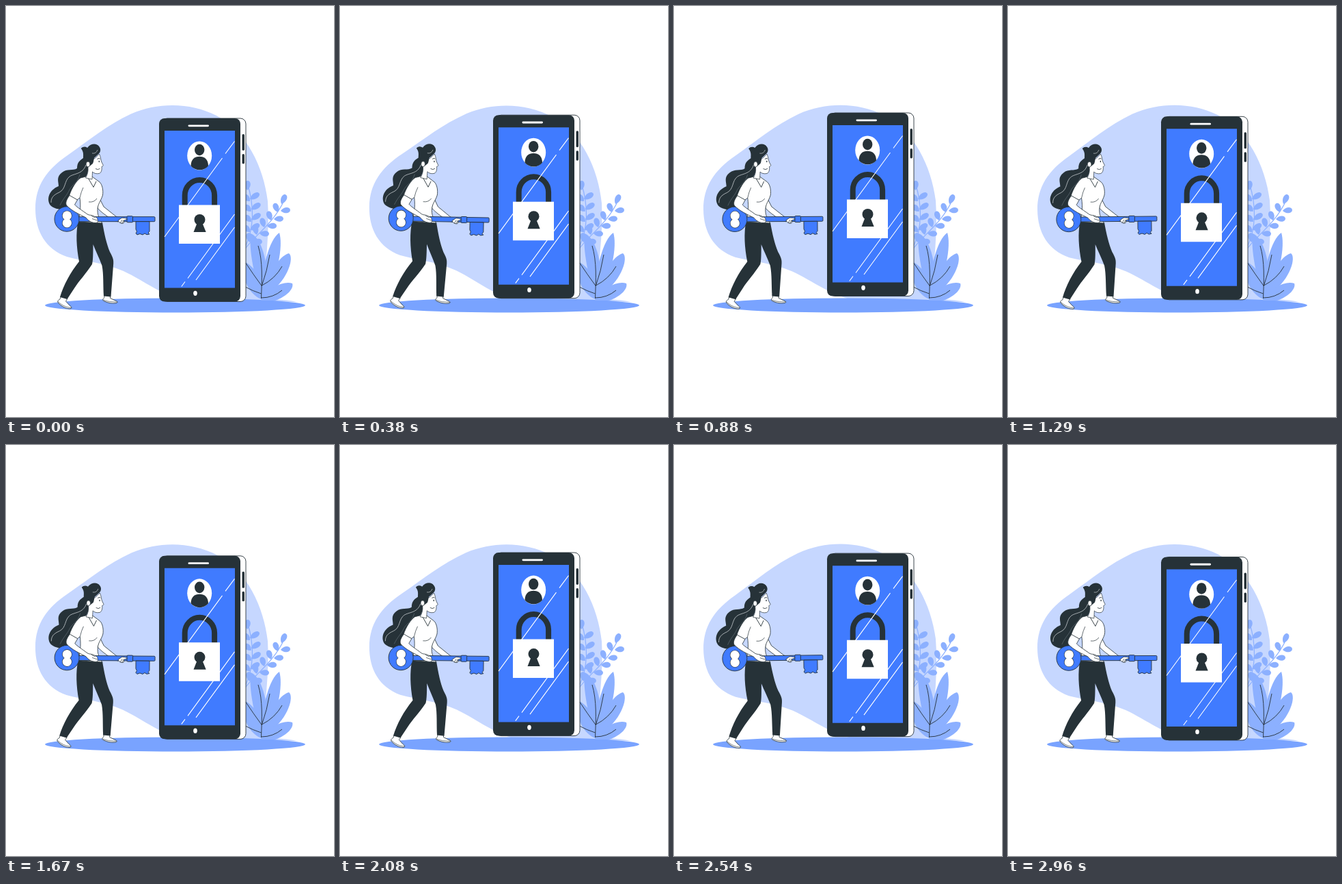
Recreate the animation shown at these times as an HTML page with a canvas. Size 480 by 600 pixels, loop 3 s.

```html
<!DOCTYPE html>
<html lang="en">
<head>
<meta charset="utf-8">
<title>Unlock</title>
<style>
html, body { margin: 0; width: 100%; height: 100%; overflow: hidden; background: #fff; }
canvas { display: block; width: 480px; height: 600px; }
</style>
</head>
<body>
<canvas id="stage"></canvas>
<script>
const canvas = document.getElementById('stage');
const ctx = canvas.getContext('2d');
const ratio = window.devicePixelRatio || 1;
canvas.width = 480 * ratio;
canvas.height = 600 * ratio;

const DARK = '#263238', BLUE = '#407bff', PALE = '#c6d7ff';
const LEAF = '#8cb0ff', FLOOR = '#79a3ff', WHITE = '#fff';
const CYCLE = 1500, LOOP = 3000, FPS = 24;
const TAU = Math.PI * 2;

function paint(path, fill, stroke, width = 0.9) {
  if (fill) { ctx.fillStyle = fill; ctx.fill(path); }
  if (stroke) { ctx.strokeStyle = stroke; ctx.lineWidth = width; ctx.stroke(path); }
}
const shape = (d, fill, stroke, width) => paint(new Path2D(d), fill, stroke, width);
const line = (d, color = DARK, width = 0.9) => shape(d, null, color, width);

function oval(x, y, rx, ry, fill, stroke, width) {
  const p = new Path2D();
  p.ellipse(x, y, rx, ry, 0, 0, TAU);
  paint(p, fill, stroke, width);
}
function box(x, y, w, h, r, fill, stroke) {
  const p = new Path2D();
  p.roundRect(x, y, w, h, r);
  paint(p, fill, stroke);
}
function turned(deg, x, y, draw) {
  ctx.save();
  ctx.translate(x, y);
  ctx.rotate(deg * Math.PI / 180);
  ctx.translate(-x, -y);
  draw();
  ctx.restore();
}
// small leaf growing from (x, y), heading in degrees clockwise from up
function leaf(x, y, heading, len = 13, w = 4.6) {
  turned(heading, x, y, () => shape(
    `M${x} ${y}C${x - w * 1.4} ${y - len * .4} ${x - w} ${y - len} ${x} ${y - len}` +
    `C${x + w} ${y - len} ${x + w * 1.4} ${y - len * .4} ${x} ${y}Z`, LEAF));
}

function blob() {
  shape('M43 296C43 263 59 239 90 218C124 194 148 174 183 157.500C224 140 270 141 308 160' +
    'C352 183 377 235 383 285C386 330 380 380 374 428C350 434 300 436 268 431' +
    'C228 423 204 402 172 387C142 374 115 373 89 366C58 355 43 329 43 296Z', PALE);
}

function plants() {
  line('M350 352C364 322 363 290 353 258', LEAF, 1.2);
  leaf(353, 269, 4, 14);
  for (let i = 0; i < 4; i++) {
    const x = 357 + Math.sin(i) * 2, y = 282 + i * 15;
    leaf(x, y, 58, 16);
    leaf(x, y + 3, -45, 13);
  }
  line('M349 356C362 336 390 320 407 284', LEAF, 1.2);
  leaf(403, 289, 25, 15);
  const twigs = [[400, 299], [390, 311], [380, 321], [369, 332], [359, 343]];
  twigs.forEach(([x, y], i) => {
    leaf(x + 2, y, 84 + i * 3, 14);
    leaf(x - 2, y + 2, -22 + i * 3, 14);
  });

  shape('M374 428C356 422 345 398 344 370C362 379 376 397 380 414Z', LEAF);
  shape('M373 424C364 396 355 357 358 332C371 337 382 362 383 408Z', LEAF);
  shape('M373 420C374 384 385 341 400 331C405 347 400 384 385 412Z', LEAF);
  shape('M374 427C380 395 399 365 414 361C422 367 413 398 387 418Z', LEAF);
  shape('M373 428C385 411 406 401 419 405C422 413 409 425 394 430L373 430Z', LEAF);
  line('M373.500 427C374.500 400 376 373 369 350');
  line('M374.500 408Q382 387 386 363');
  line('M374.500 408Q394 398 404 380');
  line('M374.500 409Q362 392 350 374');
  line('M373.500 426Q391 426 404 415');
  line('M373.500 420Q361 416 350 410');
}

function phone() {
  box(228, 164, 123, 267.500, 8, WHITE, DARK);
  box(224, 164, 119, 267.500, 8, DARK);
  box(345.500, 187, 3.500, 24, 1.700, DARK);
  box(345.500, 216, 3.500, 14.500, 1.700, DARK);
  box(232, 182, 103, 229.500, 0, BLUE);
  box(266.500, 173.400, 30.500, 2.800, 1.400, WHITE);
  oval(277, 419.300, 2.800, 3.600, WHITE);

  oval(283.200, 218.500, 18, 21, WHITE);
  oval(283.200, 210, 7.200, 8.300, DARK);
  shape('M270.500 233.500C270.500 224 276 219.800 283.200 219.800S296 224 296 233.500' +
    'C290 241.200 277 241.200 270.500 233.500Z', DARK);

  line('M261.700 292V276.500A21.700 22.500 0 0 1 305.100 276.500V292', DARK, 8);
  box(253, 290.500, 60, 56.500, 0, WHITE);
  oval(283.500, 312, 8, 8, DARK);
  shape('M280 316L274.500 330H292.700L287 316Z', DARK);

  line('M334.500 197.500L321 215.500M316.500 222L232 337', WHITE, 1.1);
  line('M334.500 304L266 397.500M262 402.500L256.800 409.500M334.500 323L278 400', WHITE, 1.1);
}

function hair() {
  shape('M110 208C113 205 116 205 119 207C124 200 133 200 136 205C140 209 138 215 134 217' +
    'C131 221 126 223 123 226C120 236 122 246 113 253C105 260 103 267 97 273' +
    'C90 282 92 291 88 297C80 298 70 296 65 291C59 283 62 269 77 263' +
    'C77 256 73 250 82 243C89 237 98 241 104 237C104 229 107 226 113 222C113 217 114 214 110 208Z', DARK);
  line('M117 232C112 246 100 244 93 249C85 255 88 267 78 272C69 276 66 280 66 287', '#dfe3e5', 0.7);
  line('M108 246C105 258 97 261 93 268C89 277 84 280 79 291', '#77838a', 0.5);
}

function head() {
  shape('M122 226C128 225 133 220 136.500 216C139 221 138.500 225 140 228L142.300 232.500' +
    'C142 234 140.800 234 140 234.500C140.500 238 140 243 136.500 244.500' +
    'C132 245.500 128 244 126.500 242L126 253L116.500 251C119.500 246 120.500 241 120 236Z',
    WHITE, DARK, 0.7);
  shape('M110 208C113 205 117 206 120 208C125 201 133 201 136 205C139 210 137 216 131 219' +
    'C128 221 129 226 127 230L121 235C116 229 114 221 116 215Z', DARK);
  oval(120, 231, 2.800, 3.800, WHITE, DARK, 0.6);
  oval(136.300, 227, 0.7, 1.2, DARK);
  line('M133.500 223.500Q135.500 221.800 137.500 223', DARK, 0.9);
  line('M131 237.500Q134.500 240 137.500 237.300', DARK, 0.8);
  line('M126 215Q132 216 134 210', '#dfe3e5', 0.6);
}

function legs() {
  shape('M143.500 421L144 425.500C141 428 141 430 144 431C150 434 157 434.500 162 433.500' +
    'C164 432.500 163 431 160 430L152.500 426.500V421Z', WHITE, DARK, 0.8);
  line('M142.500 429C148 431.500 154 432 163 432', DARK, 0.6);
  shape('M80.500 423L79 428C75 430 75 432 77 434C82 439 88 442 94 442' +
    'C97 441 96 439 93 437L87.500 431L90 427Z', WHITE, DARK, 0.8);
  line('M76 431.500C82 437 88 440 95.500 440.500', DARK, 0.6);
  shape('M105.500 314L141 316C144 333 147 347 152 359C157 368 157.500 371 157.200 376' +
    'L153.500 424.500L143 423.500C142 408 143 392 140.500 379C136 367 131 357 127.500 348' +
    'C127.500 360 127.500 371 126 377C117 391 107 401 100 412L89.500 428L79 425' +
    'C84 408 94 389 107 373C103 352 102 332 105.500 314Z', DARK);
}

function torso() {
  shape('M136 279L143 293L160 306.500L167 311L164 315L155 312C147 306 139 301 134 295Z', WHITE, DARK, 0.8);
  shape('M117 249L126 249L137 257C141 261 142.500 269 141.500 276C139 285 133.500 289 134 299' +
    'C134 307 138 312 140.500 317L105.500 315C108 305 110 294 108 280L104 283L92.500 277' +
    'C96 266 103 255 109 251Z', WHITE, DARK, 0.8);
  line('M119.500 250L128 264.500L132 256');
  line('M108 280Q110 271 113 265M121 286Q129 287 133 281', DARK, 0.7);
}

function keyShape() {
  box(104, 307.700, 114, 7, 1.2, BLUE, DARK);
  oval(89, 311, 18, 18.200, BLUE, DARK);
  for (const pass of [[DARK, 7.3], [WHITE, 6.7]])
    for (const y of [306, 316.800]) oval(89.300, y, pass[1], pass[1], pass[0]);
  shape('M190 314.700H210V329L208 331L210 333L206 333.800L203 332L200 334L196 332.500L192 334' +
    'L190 332L191.500 329L190 326Z', BLUE, DARK);
  box(177, 306.800, 8.500, 9, 1, BLUE, DARK);
}

function arms() {
  shape('M93 276.500C89 282 86.500 287 88.500 291C96 299 107 304 117 309' +
    'C120 313 124 316 130 316.500C134 317 135 314.500 134 312C134.500 309.500 132 308.500 129 307' +
    'C125 304.500 122 306 119 304C111 298 104 294 100.500 290L104.500 283Z', WHITE, DARK, 0.8);
  line('M126 310.500L133.500 313M125 306.500L130.500 309', DARK, 0.7);
  shape('M164 313L169 309.500C173 309 177 310 177 311.500L173 313L172 317C170 318 165.500 317 164 313Z',
    WHITE, DARK, 0.8);
  line('M167 317L170 312M169.500 317.500L172.500 312', DARK, 0.7);
}

function woman() {
  hair();
  legs();
  torso();
  head();
  keyShape();
  arms();
}

// 0 → 1 → 0 over one cycle
const rise = u => 1 - Math.abs(1 - 2 * u);
// 0 → 1 → -1 → 0, peaks at a quarter and three quarters
const sway = u => u < .25 ? 4 * u : u < .75 ? 2 - 4 * u : 4 * u - 4;

function draw(ms) {
  const step = Math.floor((ms % LOOP) * FPS / 1000 + 0.05);
  const u = (step * 1000 / FPS % CYCLE) / CYCLE;
  const tilt = sway(u);
  ctx.setTransform(ratio, 0, 0, ratio, 0, 0);
  ctx.fillStyle = WHITE;
  ctx.fillRect(0, 0, 480, 600);
  ctx.lineJoin = 'round';
  turned(tilt, 213, 288, blob);
  shape('M314 431C330 425 405 427 426 432Z', PALE);
  oval(247.500, 437, 190.500, 10.500, FLOOR);
  plants();
  ctx.save();
  ctx.translate(0, -9.6 * rise(u));
  phone();
  ctx.restore();
  turned(tilt, 140, 321.500, woman);
}

const start = performance.now();
function tick() {
  draw(performance.now() - start);
  requestAnimationFrame(tick);
}
tick();
</script>
</body>
</html>
```
